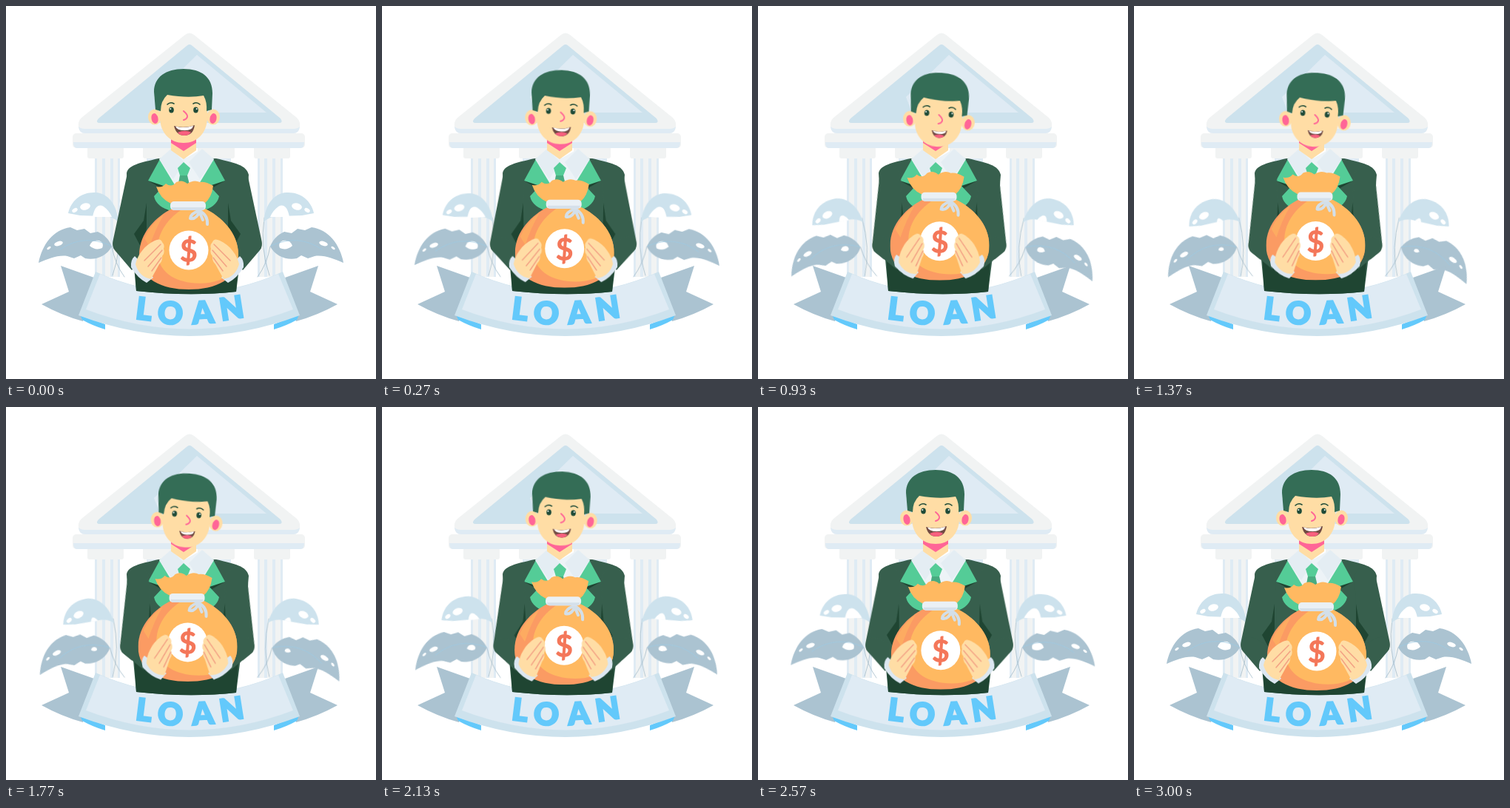
Recreate the animation shown at these times as an HTML page. Size 500 by 504 pixels, loop 3030 ms.

```html
<!DOCTYPE html>
<html lang="en">
<head>
<meta charset="utf-8">
<title>Loan</title>
<style>
  html, body { margin: 0; width: 100%; height: 100%; overflow: hidden; background: #fff; }
  svg { display: block; width: 500px; height: 504px; }

  .raise, .nod, .stem, .tilt {
    animation: 3030ms cubic-bezier(.333, 0, .667, 1) infinite;
  }
  .raise { animation-name: raise; }
  .nod   { animation-name: nod; }
  .stem  { animation-name: stem; transform-origin: 150px 362px; }
  .tilt  { animation-name: tilt; }

  .bag   { --to: translate(-1.5px, -12.5px); }
  .arm   { --to: rotate(-6deg); transform-origin: 185px 222px; }
  .fore  { --to: rotate(-5deg); transform-origin: 146px 322px; }
  .head  { --to: translate(1.5px, 5px) rotate(4deg); transform-origin: 240px 185px; }
  .mouth { --to: translate(1.5px, 0) scale(.75); transform-origin: 240px 167px; }
  .high  { --to: rotate(-8deg); }
  .low   { --to: rotate(-7deg); }
  .high > .tilt { --to: rotate(-8deg); transform-origin: 151px 292px; }
  .low > .tilt  { --to: rotate(-5deg); transform-origin: 143px 325px; }
  .right .low > .tilt { --to: rotate(-11deg); }
  .high .slit { --to: scale(.3); transform-origin: 124px 284px; }
  .low .slit  { --to: scale(.4); transform-origin: 121px 324px; }

  @keyframes raise { 0%, 92.4%, 100% { transform: none } 33%, 54.5% { transform: var(--to) } }
  @keyframes nod   { 0%, 85.8%, 100% { transform: none } 23.1%, 52.8% { transform: var(--to) } }
  @keyframes stem  { 0%, 89.1%, 100% { transform: none } 33% { transform: var(--to) } }
  @keyframes tilt  { 0%, 97.4%, 100% { transform: none } 49.5% { transform: var(--to) } }

  .stone { fill: #f1f3f3 }
  .mist  { fill: #dfebf4 }
  .sky   { fill: #cde2ed }
  .slate { fill: #abc3d1 }
  .blue  { fill: #63c9fb }
  .suit  { fill: #375f4d }
  .dark  { fill: #1f4532 }
  .green { fill: #54cc97 }
  .hair  { fill: #346d56 }
  .skin  { fill: #ffdda5 }
  .pink  { fill: #ff6597 }
  .gold  { fill: #ffb961 }
  .rust  { fill: #fb9b63 }
  .white { fill: #fff }
  .line  { fill: none; stroke-linecap: round; stroke-linejoin: round; }
  .twig  { stroke: #a5bdcb; stroke-width: .8; }
  .crease { stroke: #f3a184; stroke-width: 1.5; }
  .word { font: 900 42px Lato, Inter, sans-serif; text-anchor: middle; stroke: #63c9fb; stroke-width: 2; }
  .sign { font: 41px Lato, "Open Sans", sans-serif; text-anchor: middle; fill: #f4775a; stroke: #f4775a; stroke-width: 1.8; }
</style>
</head>
<body>
<svg viewBox="0 0 500 504">
  <!-- bank -->
  <g data-mirror="494">
    <path class="mist" d="M120 205H154V366H120Z"/>
    <path class="stone" d="M123 205H130V366H123ZM134 205H141V366H134ZM145 205H151V366H145Z"/>
    <rect class="stone" x="110" y="188" width="49" height="18" rx="3"/>
    <rect class="stone" x="185" y="188" width="50" height="18" rx="3"/>
    <path class="mist" d="M190 206H230V230H190Z"/>
  </g>
  <path class="stone" d="M242 39Q248 34 254 39L393 151Q398 156 397 163Q396 172 388 172H107Q99 172 98 163Q97 156 102 151Z"/>
  <path class="sky" d="M244 54Q248 50 252 54L371 152Q375 158 369 158H127Q120 158 125 152Z"/>
  <path class="mist" d="M258 66L200 123L208 144H352Z"/>
  <path class="mist" d="M98 163Q99 172 107 172H388Q396 172 397 163Q394 166 388 166H107Q101 166 98 163Z"/>
  <rect class="stone" x="90" y="172" width="314" height="20" rx="5"/>
  <path class="mist" d="M91 184H403Q403 192 398 192H96Q91 192 91 184Z"/>

  <!-- plants -->
  <g data-mirror="500">
    <g class="stem high">
      <path class="line twig" d="M151 286Q157 328 144 364"/>
      <g class="tilt">
        <path class="sky" d="M84 280C88 262 103 251 121 252C138 253 150 268 152 292Q143 283 130 284L100 283Z"/>
        <ellipse class="white" cx="107" cy="271" rx="7" ry="4.5" transform="rotate(-12 107 271)"/>
        <ellipse class="white" cx="93" cy="276" rx="4" ry="2.5" transform="rotate(-30 93 276)"/>
        <path class="tilt slit white" d="M117 285Q121 265 132 271Q140 277 143 285Z"/>
      </g>
    </g>
    <g class="stem low">
      <path class="line twig" d="M143 325Q147 348 160 366"/>
      <g class="tilt">
        <path class="slate" d="M44 347C49 322 64 302 87 299L96 303L106 301L114 307L124 305C133 309 140 316 143 325C136 338 121 344 107 341L101 337L92 341L83 338C70 336 57 342 44 347Z"/>
        <ellipse class="white" cx="71" cy="321" rx="6" ry="3" transform="rotate(-18 71 321)"/>
        <ellipse class="white" cx="58" cy="327" rx="3" ry="1.5" transform="rotate(-35 58 327)"/>
        <path class="tilt slit white" d="M113 324Q116 315 126 317Q133 320 130 327Q121 331 113 324Z"/>
        <path class="line" stroke="#9dc9e2" stroke-width=".8" d="M142 324Q105 307 73 329"/>
      </g>
    </g>
  </g>

  <!-- ribbon -->
  <g data-mirror="496">
    <path class="slate" d="M74 351L119 367L104 426Q75 418 48 403L85 386Z"/>
    <path class="blue" d="M100 417L134 430V437Q117 432 103 424Z"/>
  </g>
  <path class="sky" d="M121 359Q248 416 374 359L397 418Q248 474 98 418Z"/>
  <path class="mist" d="M127 362Q248 414 368 362L388 410Q248 463 108 410Z"/>
  <g class="word blue">
    <text transform="translate(185 424) rotate(7)">L</text>
    <text transform="translate(221 430) rotate(4)">O</text>
    <text transform="translate(267 429) rotate(-4)">A</text>
    <text transform="translate(307 423) rotate(-9)">N</text>
  </g>

  <!-- jacket -->
  <path class="suit" d="M163 226C165 215 180 212 206 206H284C310 212 325 215 328 228L322 300L311 386Q248 393 176 385L168 300Z"/>
  <path class="dark" d="M172 318L186 305H304L316 318L311 386Q248 393 176 385Z"/>
  <g data-mirror="488">
    <path class="dark" d="M192 236L213 248L203 257Q205 272 226 280L244 300V270L212 238Z"/>
    <path class="green" d="M209 205L192 236L213 243L200 257Q203 272 226 278L242 284V262Z"/>
    <path fill="#edf3f7" d="M223 193L207 207L244 268V205Z"/>
    <path fill="#dce7f0" d="M223 193L207 207L226 234L241 211Z" opacity=".5"/>
  </g>
  <path class="green" d="M232 219L240 211L249 219L245 229L250 250H231L235 229Z"/>
  <path class="hair" d="M235 229H245L250 250H231Z" opacity=".35"/>
  <path class="skin" d="M223 176H257V195L240 207L223 195Z"/>
  <path class="pink" d="M223 180H257V185L240 196L223 185Z"/>

  <g data-mirror="490">
    <g class="raise arm">
      <path class="suit" d="M164 226C168 214 186 210 192 228L190 270L181 306L182 330L158 340L146 328Q143 323 145 315Z"/>
      <path class="dark" d="M190 266L186 290L173 308L184 329L190 300Z"/>
      <g class="raise fore">
        <path class="suit" d="M145 318Q151 306 166 314L181 323L184 339L170 357L147 330Q143 325 145 318Z"/>
      </g>
    </g>
  </g>

  <!-- money bag -->
  <g class="raise bag">
    <path class="rust" d="M224 274C204 284 180 306 180 336C180 370 211 383 247 383C283 383 314 370 314 336C314 306 290 284 269 274Z"/>
    <path class="gold" d="M239 274C214 290 203 312 205 334C206 356 222 370 250 374C274 377 295 371 308 358Q314 348 314 336C314 306 290 284 269 274Z"/>
    <path class="gold" d="M187 314Q195 295 213 282Q201 303 194 325Z" opacity=".55"/>
    <path class="gold" d="M223 267Q208 260 203 244Q211 246 216 240Q224 246 230 238Q238 234 245 240Q254 234 262 238Q270 237 280 243Q278 259 268 267Z"/>
    <path class="line" stroke="#d3dfe9" stroke-width="4" d="M260 277Q249 281 249 287Q257 289 262 277Q273 283 272 295M261 277L266 289"/>
    <rect fill="#eaf0f5" x="222" y="264" width="48" height="12" rx="5"/>
    <path fill="#d5e0ea" d="M224 272H268Q268 276 264 276H228Q224 276 224 272Z"/>
    <circle class="white" cx="247" cy="330" r="26.5"/>
    <text class="sign" x="247" y="345">$</text>
  </g>

  <g data-mirror="490">
    <g class="raise arm">
      <g class="raise fore">
        <path fill="#dce7f1" d="M174 338Q168 343 169 353Q178 368 190 374L199 367L182 346Z"/>
        <path class="skin" d="M175 349C177 338 187 323 201 317Q209 313 211 319Q215 323 213 328Q215 334 211 338Q212 344 207 349L196 369Q180 366 175 349Z"/>
        <path class="line crease" d="M209 322L187 344M211 330L192 352M210 340L197 358"/>
      </g>
    </g>
  </g>

  <!-- head -->
  <g class="nod head">
    <g data-mirror="481">
      <ellipse class="skin" cx="201" cy="150" rx="9" ry="10.5"/>
      <ellipse class="pink" cx="201" cy="152" rx="4.500" ry="7" transform="rotate(-12 201 152)"/>
    </g>
    <path class="skin" d="M208 116H272V150C272 172 258 185 240 185C222 185 208 172 208 150Z"/>
    <path class="hair" d="M202 140L200 116C200 96 216 85 240 85C264 85 279 96 279 118L278 140L271 142Q272 130 267 121Q246 125 218 120Q209 128 209 142Z"/>
    <g data-mirror="480">
      <ellipse fill="#1f4b38" cx="223.5" cy="140.500" rx="3.300" ry="4"/>
      <circle class="white" cx="222.3" cy="139" r="1"/>
      <path class="line" stroke="#1f4b38" stroke-width="1.6" d="M218 133Q222 129 227 132"/>
    </g>
    <path class="line" stroke="#ff6597" stroke-width="2" d="M240 142Q246 147 245 150Q244 153 240 154"/>
    <g class="nod mouth">
      <path fill="#714b43" d="M227 162Q241 166 255 161Q253 175 241 175Q230 175 227 162Z"/>
      <path class="white" d="M229 162.500Q241 166 253 161.700Q252 168 241 168Q231 168 229 162.500Z"/>
      <path fill="#f75f7e" d="M232 171Q241 167 250 170.500Q247 175 241 175Q235 175 232 171Z"/>
    </g>
  </g>
</svg>
<script>
  // Give each symmetrical group its right-hand twin.
  for (const part of document.querySelectorAll('[data-mirror]')) {
    const twin = part.cloneNode(true);
    twin.setAttribute('class', 'right');
    twin.setAttribute('transform', `matrix(-1 0 0 1 ${part.dataset.mirror} 0)`);
    part.after(twin);
  }
</script>
</body>
</html>
```
